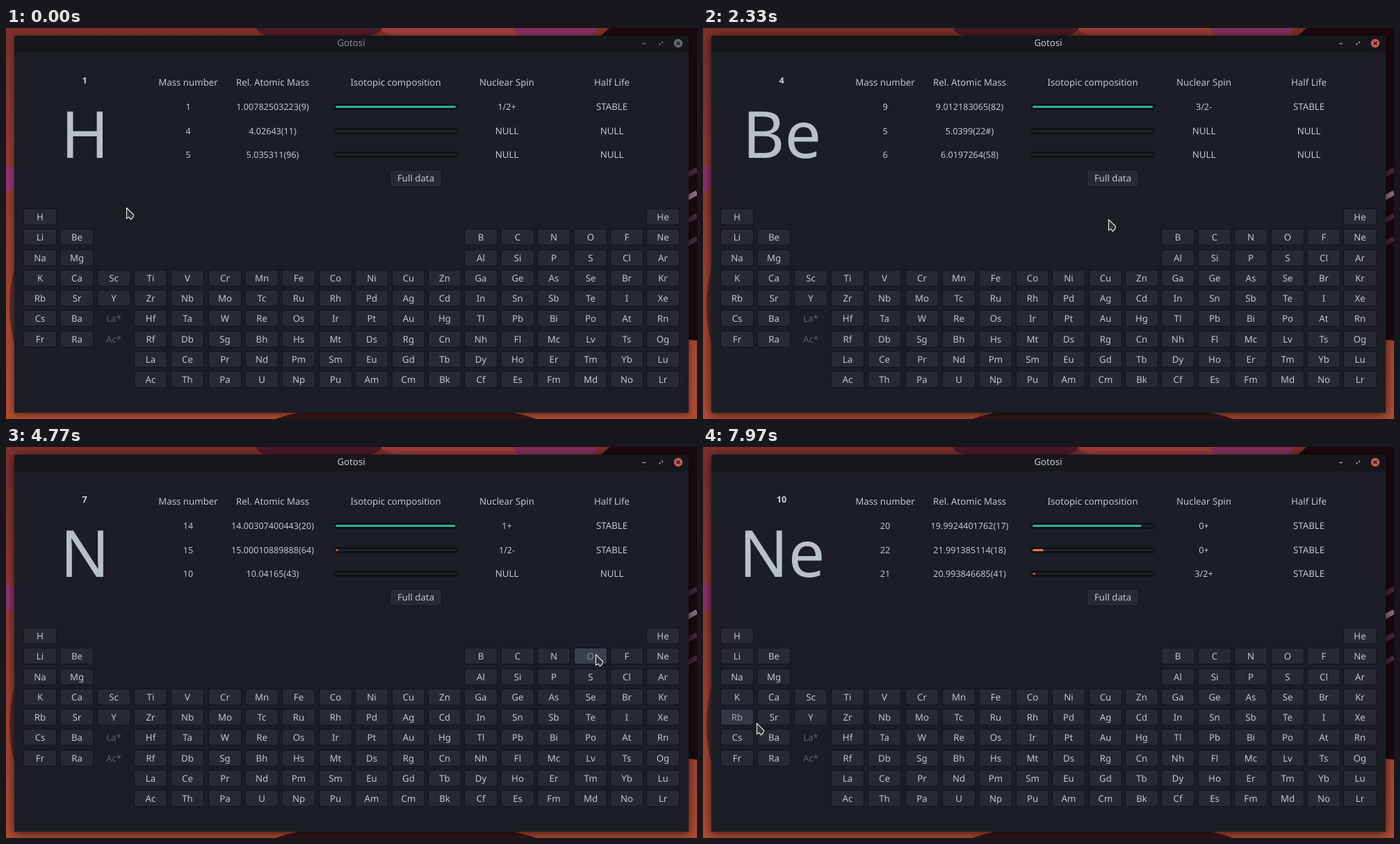
Recreate the animation shown at these times as an HTML page with a canvas. Size 994 by 563 pixels, loop 8 s.

```html
<!DOCTYPE html>
<html lang="en">
<head>
<meta charset="utf-8">
<title>Gotosi</title>
<style>
html, body { margin: 0; width: 100%; height: 100%; overflow: hidden; background: #1b1e25; }
canvas { display: block; width: 994px; height: 563px; }
</style>
</head>
<body>
<canvas id="stage" width="994" height="563"></canvas>
<script>
const W = 994, H = 563, LOOP = 8000, HOLD = 100, FADE = 200;
const ctx = document.getElementById('stage').getContext('2d');
const FONT = '"Noto Sans", "Open Sans", sans-serif';
const LABEL = 13.25, NUMBER = 12.6, SYMBOL = 93.33;
const INK = [192, 197, 206];

// Periodic table, one row per line; "." is an empty cell
const cells = [];
[
  'H . . . . . . . . . . . . . . . . He',
  'Li Be . . . . . . . . . . B C N O F Ne',
  'Na Mg . . . . . . . . . . Al Si P S Cl Ar',
  'K Ca Sc Ti V Cr Mn Fe Co Ni Cu Zn Ga Ge As Se Br Kr',
  'Rb Sr Y Zr Nb Mo Tc Ru Rh Pd Ag Cd In Sn Sb Te I Xe',
  'Cs Ba La* Hf Ta W Re Os Ir Pt Au Hg Tl Pb Bi Po At Rn',
  'Fr Ra Ac* Rf Db Sg Bh Hs Mt Ds Rg Cn Nh Fl Mc Lv Ts Og',
  '. . . La Ce Pr Nd Pm Sm Eu Gd Tb Dy Ho Er Tm Yb Lu',
  '. . . Ac Th Pa U Np Pu Am Cm Bk Cf Es Fm Md No Lr'
].forEach((line, row) => line.split(' ').forEach((sym, col) => {
  if (sym === '.') return;
  const x = Math.round(25 + 53.1 * Math.min(col, 8) + 52.4 * Math.max(0, col - 8));
  cells.push({ sym, x, y: Math.round(260 + 29.25 * row), w: 48, h: 24 });
}));

// Isotope lines: mass number, atomic mass, percent, spin, half life
const ELEMENTS = {
  H: [1, '1 1.00782503223(9) 99.99 1/2+ STABLE', '4 4.02643(11) 0 NULL NULL', '5 5.035311(96) 0 NULL NULL'],
  Be: [4, '9 9.012183065(82) 100 3/2- STABLE', '5 5.0399(22#) 0 NULL NULL', '6 6.0197264(58) 0 NULL NULL'],
  B: [5, '11 11.00930536(45) 80.1 3/2- STABLE', '10 10.01293695(41) 19.9 3+ STABLE', '6 6.0508(22#) 0 NULL NULL'],
  C: [6, '12 12.0000000(00) 98.93 0+ STABLE', '13 13.00335483507(23) 1.07 1/2- STABLE', '8 8.037643(20) 0 NULL NULL'],
  N: [7, '14 14.00307400443(20) 99.64 1+ STABLE', '15 15.00010889888(64) 0.36 1/2- STABLE', '10 10.04165(43) 0 NULL NULL'],
  O: [8, '16 15.99491461957(17) 99.76 0+ STABLE', '18 17.99915961286(76) 0.2 0+ STABLE', '17 16.99913175650(69) 0.04 5/2+ STABLE'],
  F: [9, '19 18.99840316273(92) 100 1/2+ STABLE', '14 14.034315(44) 0 NULL NULL', '15 15.018043(67) 0 NULL NULL'],
  Ne: [10, '20 19.9924401762(17) 90.48 0+ STABLE', '22 21.991385114(18) 9.25 0+ STABLE', '21 20.993846685(41) 0.27 3/2+ STABLE']
};

// Pointer moves: a time span, a place to reach, and maybe an arched path and a click
const HOME = [173, 258];
const MOVES = [
  { from: 300, to: 850, at: [98, 296], sym: 'Be', press: 1200 },
  { from: 1340, to: 2830, at: [694, 295], lift: 23, sym: 'B', press: 2970 },
  { from: 3080, to: 3780, at: [745, 301], sym: 'C', press: 3700 },
  { from: 3800, to: 4120, at: [795, 291], sym: 'N', press: 4330 },
  { from: 4430, to: 4900, at: [856, 299], sym: 'O', press: 4970 },
  { from: 5430, to: 5670, at: [904, 302], sym: 'F', press: 5930 },
  { from: 6060, to: 6450, at: [938, 301], sym: 'Ne', press: 6500 },
  { from: 7370, to: 7800, at: [46, 382], lift: 12 },
  { from: 7800, to: 7970, at: [77, 397] }
];
const CLICKS = MOVES.filter(m => m.sym);
const FOCUS = CLICKS[0].press;

const clamp = v => Math.max(0, Math.min(1, v));
const mix = (a, b, k) => a.map((v, i) => v + (b[i] - v) * k);
const rgb = c => `rgb(${c.map(Math.round).join()})`;
const ease = u => (u * u * (3 - 2 * u) + 1 - (1 - u) ** 2) / 2;

function pointer(t) {
  let p = HOME;
  for (const m of MOVES) {
    if (t < m.from) break;
    const u = clamp((t - m.from) / (m.to - m.from));
    p = mix(p, m.at, ease(u));
    p[1] -= (m.lift || 0) * Math.sin(Math.PI * u);
  }
  return p;
}

const inside = (b, [x, y]) => x >= b.x && x < b.x + b.w && y >= b.y && y < b.y + b.h;

const hoverLevel = (b, trail) =>
  trail.reduce((v, p) => clamp(v + (inside(b, p) ? 10 : -10) / FADE), 0);

function pressLevel(sym, t) {
  const c = CLICKS.find(k => k.sym === sym);
  if (!c || t < c.press) return 0;
  return t < c.press + HOLD ? clamp((t - c.press + 20) / 50) : clamp(1 - (t - c.press - HOLD) / FADE);
}

function text(s, x, y, color, size = LABEL, weight = 400) {
  ctx.font = `${weight} ${size}px ${FONT}`;
  ctx.textAlign = 'center';
  ctx.textRendering = 'geometricPrecision';
  ctx.fillStyle = color;
  ctx.fillText(s, x, y);
}

function box(x, y, w, h, r, color) {
  ctx.beginPath();
  ctx.roundRect(x, y, w, h, r);
  ctx.fillStyle = color;
  ctx.fill();
}

function blob(x, y, rx, ry, color) {
  ctx.beginPath();
  ctx.ellipse(x, y, rx, ry, 0, 0, 7);
  ctx.fillStyle = color;
  ctx.fill();
}

function line(x1, y1, x2, y2, color, width) {
  ctx.strokeStyle = color;
  ctx.lineWidth = width;
  ctx.beginPath();
  ctx.moveTo(x1, y1);
  ctx.lineTo(x2, y2);
  ctx.stroke();
}

function button(b, label, hover = 0, press = 0) {
  const fill = mix(mix([38, 42, 51], [59, 64, 78], hover), [52, 152, 219], press);
  const ink = mix(mix(INK, [128, 133, 144], hover), [238, 243, 248], press);
  box(b.x, b.y, b.w, b.h, 3, rgb(mix([18, 20, 25], fill, press)));
  box(b.x + 1, b.y + 1, b.w - 2, b.h - 2, 2, rgb(fill));
  text(label, b.x + b.w / 2, b.y + 17, rgb(ink));
}

function wallpaper(focus) {
  const g = ctx.createLinearGradient(0, 0, 0, H);
  g.addColorStop(0, '#7c2f2c');
  g.addColorStop(1, '#b04a34');
  ctx.fillStyle = g;
  ctx.fillRect(0, 0, W, H);
  blob(650, 0, 110, 20, '#9c3c3c');
  blob(450, 0, 90, 20, '#4a1a28');
  blob(790, 0, 60, 20, '#85305a');
  blob(0, 217, 16, 20, '#90336a');
  blob(110, 400, 105, 150, '#5a2a26');
  blob(575, 585, 215, 45, '#38161a');
  blob(1000, 200, 220, 250, '#1b080e');
  for (let i = 0; i < 4; i++) line(980, 212 + 33 * i, W, 204 + 33 * i, i === 1 ? '#8d6c7a' : '#4a2535', 7);
  ctx.save();
  ctx.shadowColor = `rgba(0,0,0,${0.5 + 0.2 * focus})`;
  ctx.shadowBlur = 9 + 5 * focus;
  ctx.shadowOffsetY = 2;
  box(12, 11, 970, 543, [4, 4, 0, 0], '#1b1e25');
  ctx.restore();
}

function titleBar(focus) {
  const dark = '#15171b', icon = rgb(mix([112, 115, 121], [150, 154, 160], focus));
  box(12, 11, 970, 24, [4, 4, 0, 0], dark);
  text('Gotosi', 496.5, 26, rgb(mix([139, 142, 148], [200, 204, 210], focus)));
  line(915, 22.5, 920, 22.5, icon, 1.4);
  line(943, 19.5, 945, 22, icon, 1.5);
  line(939.5, 22, 941.5, 24.5, icon, 1.5);
  blob(967, 22, 6.2, 6.2, rgb(mix([100, 103, 108], [204, 87, 93], focus)));
  for (const d of [-2.3, 2.3]) line(967 - d, 19.7, 967 + d, 24.3, dark, 1.5);
}

function bar(y, pct) {
  box(472, y - 4, 178, 9, 3, '#101216');
  box(474, y - 1, 174, 3, 1.5, '#20232a');
  if (pct) box(474, y - 1, Math.max(4, 1.73 * pct), 3, 1.5, pct > 50 ? '#2eb398' : pct > 2 ? '#f27835' : '#b35c30');
}

function panel(sym) {
  const [num, ...lines] = ELEMENTS[sym], ink = rgb(INK);
  const cols = [262, 383.5, 560.5, 720.5, 871.5];
  text(num, 113, 80, rgb([205, 210, 217]), NUMBER, 700);
  text(sym, 113.5, 187, '#b8c1c9', SYMBOL);
  ['Mass number', 'Rel. Atomic Mass', 'Isotopic composition', 'Nuclear Spin', 'Half Life']
    .forEach((s, i) => text(s, cols[i], 83, ink));
  lines.forEach((l, row) => {
    const y = Math.round(113 + 34.6 * row);
    l.split(' ').forEach((s, i) => {
      if (i === 2) bar(y, +s);
      else text(s, cols[i], y + 5, ink, /\d/.test(s) ? NUMBER : LABEL);
    });
  });
  button({ x: 552, y: 204, w: 75, h: 25 }, 'Full data');
}

function arrow([x, y]) {
  ctx.save();
  ctx.translate(Math.round(x) + 0.5, Math.round(y) + 0.8);
  const shape = new Path2D('M0 0L10.3 10.3L8.8 14.2L5.8 17L3.5 13.4L0 15.6Z');
  ctx.fillStyle = '#34353a';
  ctx.fill(shape);
  ctx.strokeStyle = '#f2f2f2';
  ctx.lineWidth = 1.1;
  ctx.lineJoin = 'round';
  ctx.stroke(shape);
  ctx.restore();
}

function draw(t) {
  const focus = clamp((t - FOCUS + 30) / 150);
  wallpaper(focus);
  titleBar(focus);
  panel(CLICKS.reduce((s, c) => t >= c.press + HOLD ? c.sym : s, 'H'));
  const trail = [];
  for (let s = t - 2 * FADE; s <= t; s += 10) trail.push(pointer(s));
  for (const c of cells) {
    if (c.sym.endsWith('*')) text(c.sym, c.x + c.w / 2, c.y + 17, '#5a5e66');
    else button(c, c.sym, hoverLevel(c, trail), pressLevel(c.sym, t));
  }
  arrow(pointer(t));
}

const start = performance.now();
function tick() {
  draw((performance.now() - start) % LOOP);
  requestAnimationFrame(tick);
}
tick();
</script>
</body>
</html>
```
